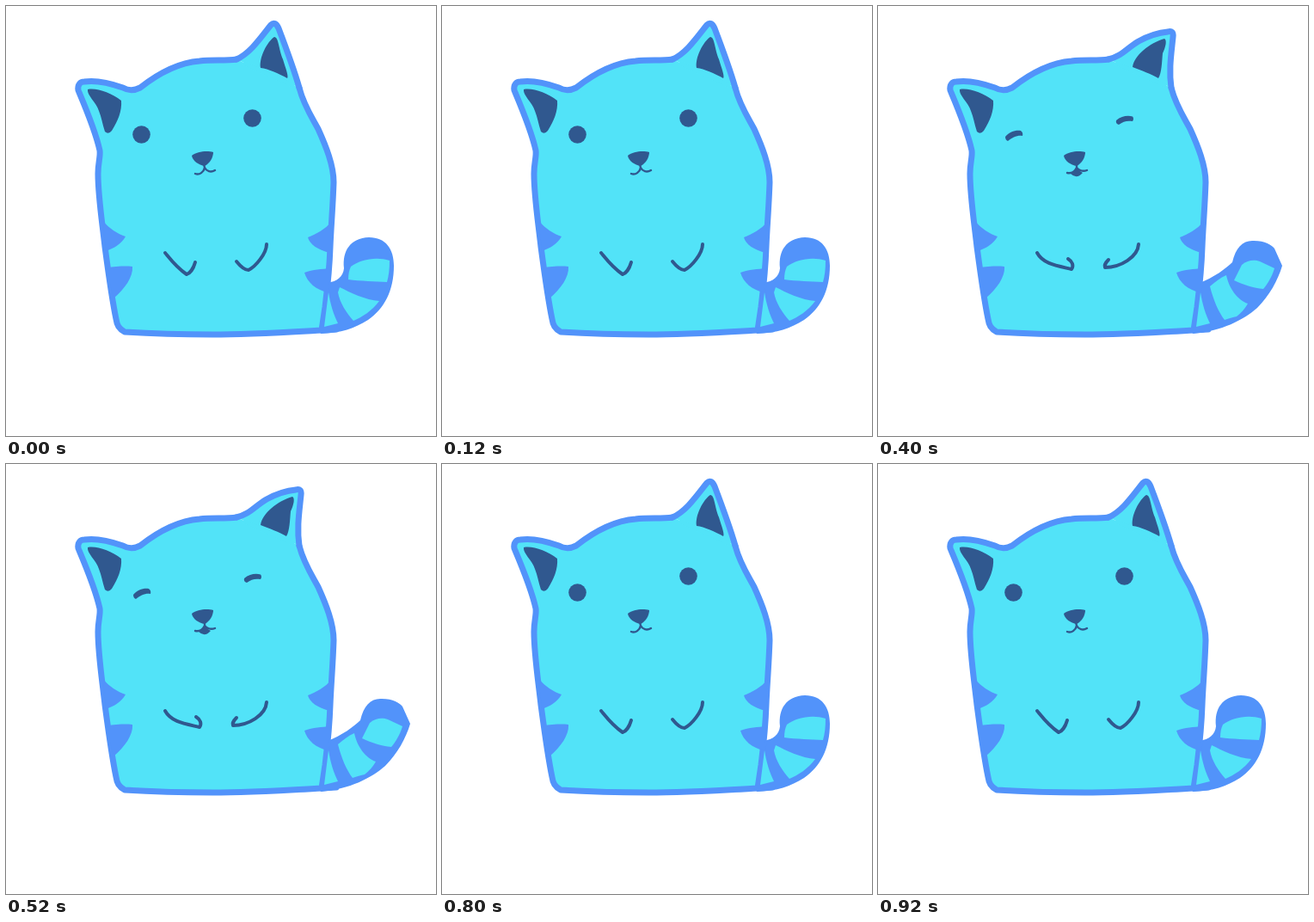
An HTML page without scripts that plays this animation: 500 by 500 pixels, repeating every 1 s.

```html
<!DOCTYPE html>
<html lang="en">
<head>
<meta charset="utf-8">
<title>Blinking cat</title>
<style>
  html, body { margin: 0; width: 100%; height: 100%; overflow: hidden; background: #fff; }
  svg { display: block; width: 100%; height: 100%; }

  .skin { fill: #52e3f8; }
  .blue { fill: #5293fa; }
  .dark { fill: #30588f; }
  .edge { stroke: #5293fa; stroke-width: 7; stroke-linecap: round; stroke-linejoin: round; }
  .seam { stroke: #52e3f8; stroke-width: 5; }
  .line { fill: none; stroke: #30588f; stroke-width: 4; stroke-linecap: round; stroke-linejoin: round; }
  .thin { stroke-width: 2.4; }

  /* Three held poses: awake, drowsy, asleep, drowsy, awake */
  .awake, .drowsy, .asleep { visibility: hidden; animation: 1s step-end infinite; }
  .awake { animation-name: awake; }
  .drowsy { animation-name: drowsy; }
  .asleep { animation-name: asleep; }
  @keyframes awake { 0%, 80%, 100% { visibility: visible; } 20% { visibility: hidden; } }
  @keyframes drowsy { 0%, 40%, 80%, 100% { visibility: hidden; } 20%, 60% { visibility: visible; } }
  @keyframes asleep { 0%, 60%, 100% { visibility: hidden; } 40% { visibility: visible; } }
</style>
</head>
<body>
<svg viewBox="0 0 500 500">
  <defs>
    <path id="lid" d="M148 148C154 142 162 142 168 145L167 154C161 153 157 155 153 158C149 157 147 153 148 148Z"/>
  </defs>

  <!-- tail -->
  <g class="awake">
    <path class="blue" d="M374 322C385 320 392 315 393 305C391 285 400 270 422 269C442 269 451 283 451 302C451 331 440 352 421 365C405 375 390 380 366 381Z"/>
    <path class="skin" d="M398 318C398 312 399 307 401 303C412 295 430 291 446 296C446 306 445 314 443 321C430 320 412 320 398 318Z"/>
    <path class="skin" d="M388 327C400 333 418 342 434 343C426 354 414 362 404 366C396 357 388 345 386 333Z"/>
  </g>
  <g class="drowsy">
    <path class="blue" d="M374 322C388 318 396 308 396 300C400 280 412 272 428 272C446 273 455 284 454 302C453 328 441 347 426 359C410 372 395 379 366 381Z"/>
    <path class="skin" d="M400 314C404 304 412 297 424 297C434 296 442 299 449 304C448 314 446 321 444 327C428 327 412 322 400 314Z"/>
    <path class="skin" d="M390 321C400 331 414 340 429 344C421 355 411 363 404 366C396 358 389 345 388 333Q388 325 390 321Z"/>
  </g>
  <g class="asleep">
    <path class="blue" d="M374 322C390 316 405 305 412 298C416 280 425 272 437 273C450 273 458 278 461 282L470 302C465 319 455 337 441 351C425 365 400 378 366 381Z"/>
    <path class="skin" d="M414 319L423 301C430 295 438 295 444 297L461 305C458 315 453 323 448 329C437 328 424 324 414 319Z"/>
    <path class="skin" d="M386 326C392 321 398 316 405 313C408 328 418 342 430 346C426 353 422 357 417 361C411 362 407 364 403 365C396 356 390 342 386 326Z"/>
  </g>

  <!-- body -->
  <path class="skin edge" d="M341 95C346 115 356 130 363 143C372 163 381 185 381 205C380 235 378 255 377 280C376 310 374 325 371 350L367 377C330 379 280 382 240 382C200 382 170 381 138 379C131 375 129 371 128 364C124 345 119 310 115 280C111 245 107 220 107 195C107 182 110 175 109 168C104 145 92 117 84 98C83 92 86 88 91 88C104 86 122 90 136 95C143 99 150 98 156 95C175 80 200 66 225 64C240 62 255 64 268 62"/>
  <path class="edge" d="M367 377L384 376"/>
  <path class="skin" d="M375 333C377 346 381 359 386 369L370 373Z"/>
  <g class="blue">
    <path d="M113 250C120 259 130 265 139 268C134 277 125 282 116 285Z"/>
    <path d="M117 304C128 303 138 302 147 303C148 315 138 329 125 340Z"/>
    <path d="M379 250C371 260 361 265 351 269C353 277 363 284 377 287Z"/>
    <path d="M377 305C367 306 357 306 347 310C350 321 361 331 375 333Z"/>
  </g>

  <!-- moving ear -->
  <path class="skin edge awake" d="M268 62C284 55 296 37 308 22Q313 17 317 26C328 55 335 74 341 95"/>
  <path class="skin edge drowsy" d="M268 62C286 54 301 34 323 24Q332 19 333 28C335 48 338 72 341 95"/>
  <path class="skin edge asleep" d="M268 62C284 58 288 50 303 41C314 35 326 31 337 30Q344 28 343 36C341 56 338 74 341 95"/>
  <path class="seam" d="M276 66L335 93"/>
  <g class="dark">
    <path d="M95 97C106 95 122 101 134 110C135 122 130 134 123 145Q119 150 115 146C112 137 111 129 108 122C105 112 94 104 95 97Z"/>
    <path class="awake" d="M312 36C304 41 294 60 296 72C305 73 318 79 327 84C329 82 325 72 322 62C317 50 317 36 312 36Z"/>
    <path class="drowsy" d="M324 33C312 37 297 56 296 72C308 75 319 80 329 84Q333 82 332 74C331 62 328 53 328 45C328 36 328 32 324 33Z"/>
    <path class="asleep" d="M333 38C316 43 298 57 296 71C306 75 318 79 326 84C330 78 330 65 331 55C335 47 336 39 333 38Z"/>
    <path d="M216 174C222 169 234 168 241 170C241 176 237 183 231 186C224 185 217 180 216 174Z"/>
  </g>

  <!-- eyes, mouth, paws -->
  <g class="awake">
    <circle class="dark" cx="157.5" cy="149.5" r="10.3"/>
    <circle class="dark" cx="286.5" cy="130.5" r="10.3"/>
    <path class="line thin" d="M230 184L231 188C230 193 225 197 220 195M231 188C233 192 238 194 243 191"/>
    <path class="line" d="M185 287C190 293 198 304 210 312C214 311 218 305 220 298M268 297C272 302 277 307 282 307C290 303 303 288 303 277"/>
  </g>
  <g class="drowsy">
    <use class="dark" href="#lid"/>
    <use class="dark" href="#lid" x="129" y="-20.5"/>
    <path class="line thin" d="M231 184V188C229 193 225 196 220 195M231 188C233 192 238 193 243 191"/>
    <path class="dark" d="M231 187C228 192 226 194 223 196Q232 193 239 193Q234 191 231 187Z"/>
    <path class="line" d="M185 287C192 296 205 305 220 311C224 307 224 301 222 297M268 296C268 301 269 306 272 309C285 304 303 292 303 277"/>
  </g>
  <g class="asleep">
    <path class="dark" d="M148 152C153 146 160 144 166 145Q169 147 168 151C162 150 156 153 151 157Q148 156 148 152Z"/>
    <path class="dark" d="M277 133C283 128 290 127 296 128.5Q298 131 296 134C290 133 285 134 280 138Q276 137 277 133Z"/>
    <path class="line thin" d="M231 184V188C229 192 225 195 220 194M231 188C233 191 238 193 243 191"/>
    <path class="dark" d="M231 188C229 192 227 194 224 195Q231 202 238 194Q234 192 231 188Z"/>
    <path class="line" d="M185 287C192 300 208 302 225 306C228 302 226 297 221 294M268 295C265 298 263 302 264 304C282 304 302 292 303 277"/>
  </g>
</svg>
</body>
</html>
```
